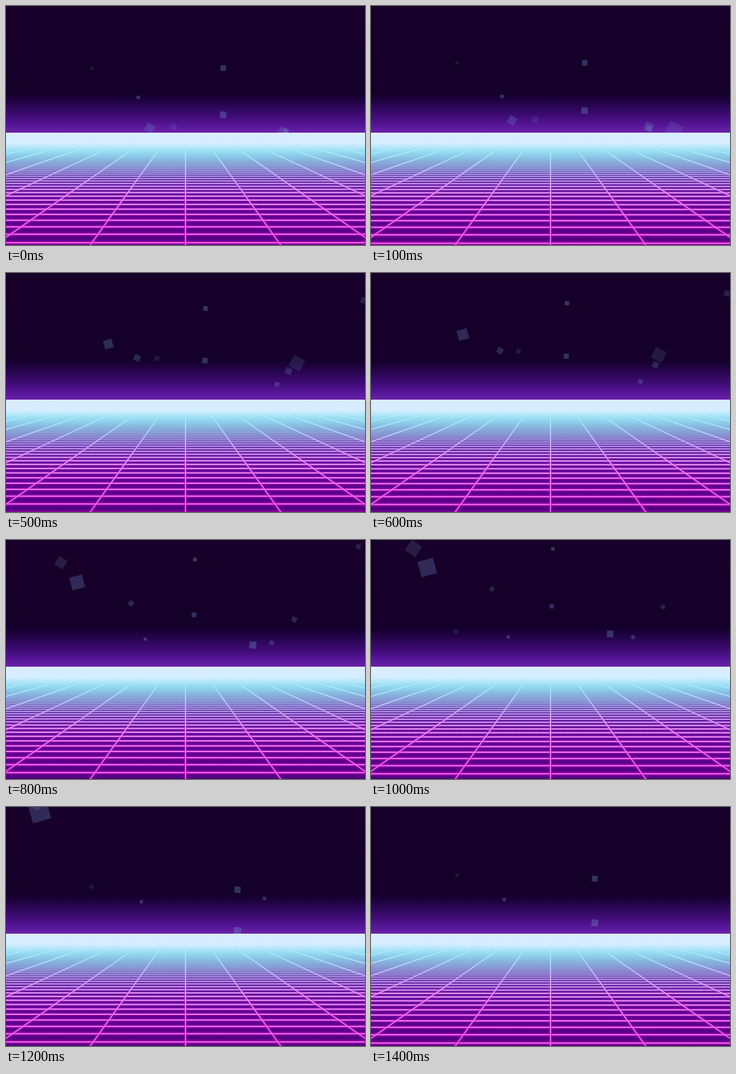
Animation, 600 px wide and 400 px high, one loop 1.5 s. Source, as an HTML page with a canvas:

```html
<!DOCTYPE html>
<html lang="en">
<head>
<meta charset="utf-8">
<title>Neon grid</title>
<style>
html, body { margin: 0; width: 100%; height: 100%; overflow: hidden; background: #150029; }
canvas { display: block; width: 600px; height: 400px; }
</style>
</head>
<body>
<canvas id="stage" width="600" height="400"></canvas>
<script>
const ctx = document.getElementById('stage').getContext('2d');
const W = 600, H = 400, HORIZON = 212, VANISH = 178;
const LOOP = 1500, STEP = 100;
const ROW_GAP = 0.000318, FIRST_ROW = 1 / 204, COLUMN_SLOPE = 0.717;

function gradient(stops) {
  const top = stops[0][0], bottom = stops[stops.length - 1][0];
  const g = ctx.createLinearGradient(0, top, 0, bottom);
  for (const [y, color] of stops) g.addColorStop((y - top) / (bottom - top), color);
  return g;
}

const sky = gradient([[0, '#170029'], [146, '#14002a'], [158, '#1e0340'], [168, '#2b0655'],
  [185, '#400c77'], [200, '#571698'], [212, '#6a22a8']]);
const ground = gradient([[212, '#dcecff'], [226, '#d8edff'], [235, '#bae8fa'], [244, '#90d6ee'],
  [255, '#82b4da'], [268, '#7a86c6'], [284, '#6840ae'], [302, '#6220a2'],
  [325, '#640c9a'], [350, '#600092'], [400, '#50007e']]);
const core = gradient([[212, '#e0f2ff'], [245, '#b8f0fa'], [268, '#b4d8f6'], [288, '#d0b8f6'],
  [312, '#f2a4fa'], [345, '#fa84f2'], [400, '#ff68ec']]);
const glow = gradient([[250, '#80c8f0'], [285, '#a060d8'], [320, '#c020d8'], [400, '#d800d0']]);
const fog = gradient([[212, 'rgba(220,236,255,1)'], [230, 'rgba(212,238,255,.95)'],
  [242, 'rgba(160,228,246,.5)'], [258, 'rgba(140,220,244,.12)'], [275, 'rgba(140,220,244,0)']]);

// size runs from first to second; path is time, x, y for each point
const squares = [
  { size: [10, 34], alpha: .3, angle: -.28,
    path: [300, 202, 152, 500, 171, 119, 800, 119, 71, 1000, 94, 46, 1300, 37, -11] },
  { size: [14, 26], alpha: .2, angle: .6, path: [700, 102, 50, 1000, 71, 14, 1200, 50, -11] },
  { size: [14, 7], alpha: .28, angle: .5, path: [0, 240, 204, 500, 219, 142, 1000, 202, 82] },
  { size: [12, 6], alpha: .36, angle: .08,
    path: [700, 419, 185, 1400, 374, 120, 1500, 363, 104, 2500, 304, 15] },
  { size: [12, 7], alpha: .36, angle: .1,
    path: [1200, 387, 207, 1400, 374, 194, 1500, 363, 182, 2500, 302, 111] },
  { size: [9, 6], alpha: .3, angle: .3, path: [0, 468, 210, 1200, 432, 153] },
  { size: [5, 6], alpha: .36, angle: .3, path: [800, 233, 166, 1500, 221, 153, 1900, 214, 147] },
  { size: [15, 7], alpha: .25, angle: .4, path: [0, 463, 211, 300, 466, 185, 1000, 488, 112] },
  { size: [24, 20], alpha: .18, angle: .5, path: [100, 506, 208, 600, 481, 137] },
  { size: [10, 8], alpha: .16, angle: .2, path: [0, 280, 202, 600, 247, 131] },
  { size: [8, 4], alpha: .16, angle: .2, path: [900, 141, 163, 1400, 144, 114, 1800, 143, 76] },
  { size: [10, 8], alpha: .22, angle: .3, path: [500, 598, 46, 800, 589, 11] }
];

function pointAt(path, t) {
  for (let i = 0; i + 5 < path.length; i += 3) {
    const [t0, x0, y0, t1, x1, y1] = path.slice(i, i + 6);
    if (t < t0 || t > t1) continue;
    const k = (t - t0) / (t1 - t0);
    return [x0 + (x1 - x0) * k, y0 + (y1 - y0) * k];
  }
  return null;
}

function drawSquare({ size, alpha, angle, path }, t) {
  const point = pointAt(path, t);
  if (!point) return;
  const k = (t - path[0]) / (path[path.length - 3] - path[0]);
  const side = size[0] + (size[1] - size[0]) * k;
  ctx.save();
  ctx.translate(...point);
  ctx.rotate(angle);
  ctx.globalAlpha = alpha;
  ctx.fillStyle = '#6c8cc0';
  ctx.fillRect(-side / 2, -side / 2, side, side);
  ctx.restore();
}

function band(y, height, alpha, fill) {
  ctx.globalAlpha = alpha;
  ctx.fillStyle = fill;
  ctx.fillRect(0, y - height / 2, W, height);
}

function drawRows(phase) {
  for (let row = -4; row < 60; row++) {
    const depth = FIRST_ROW + (row - phase) * ROW_GAP;
    const y = VANISH + 1 / depth;
    const gap = ROW_GAP / (depth * depth);
    if (y > H + 6 || gap < 1.6) continue;
    const strength = Math.min(1, (gap - 1.4) / 2);
    band(y, gap * .62, .16 * strength, glow);
    band(y, gap * .38, .3 * strength, glow);
    band(y, Math.min(2.2, gap * .36), .95 * strength, core);
  }
  ctx.globalAlpha = 1;
}

function drawColumns() {
  ctx.beginPath();
  for (let i = -8; i <= 8; i++) {
    ctx.moveTo(300 + i * COLUMN_SLOPE * (HORIZON - VANISH), HORIZON);
    ctx.lineTo(300 + i * COLUMN_SLOPE * (H + 4 - VANISH), H + 4);
  }
  for (const [width, alpha, color] of [[7, .14, glow], [4, .3, glow], [1.9, .9, core]]) {
    ctx.lineWidth = width;
    ctx.globalAlpha = alpha;
    ctx.strokeStyle = color;
    ctx.stroke();
  }
  ctx.globalAlpha = 1;
}

function draw(t) {
  ctx.fillStyle = sky;
  ctx.fillRect(0, 0, W, HORIZON);
  for (const square of squares) {
    drawSquare(square, t);
    drawSquare(square, t + LOOP);
  }
  ctx.save();
  ctx.beginPath();
  ctx.rect(0, HORIZON, W, H - HORIZON);
  ctx.clip();
  ctx.fillStyle = ground;
  ctx.fillRect(0, HORIZON, W, H - HORIZON);
  drawRows(t / LOOP);
  drawColumns();
  ctx.fillStyle = fog;
  ctx.fillRect(0, HORIZON, W, 64);
  ctx.restore();
}

const start = performance.now();
function tick() {
  const elapsed = performance.now() - start;
  draw(Math.floor(elapsed % LOOP / STEP) * STEP);
  requestAnimationFrame(tick);
}
tick();
</script>
</body>
</html>
```
